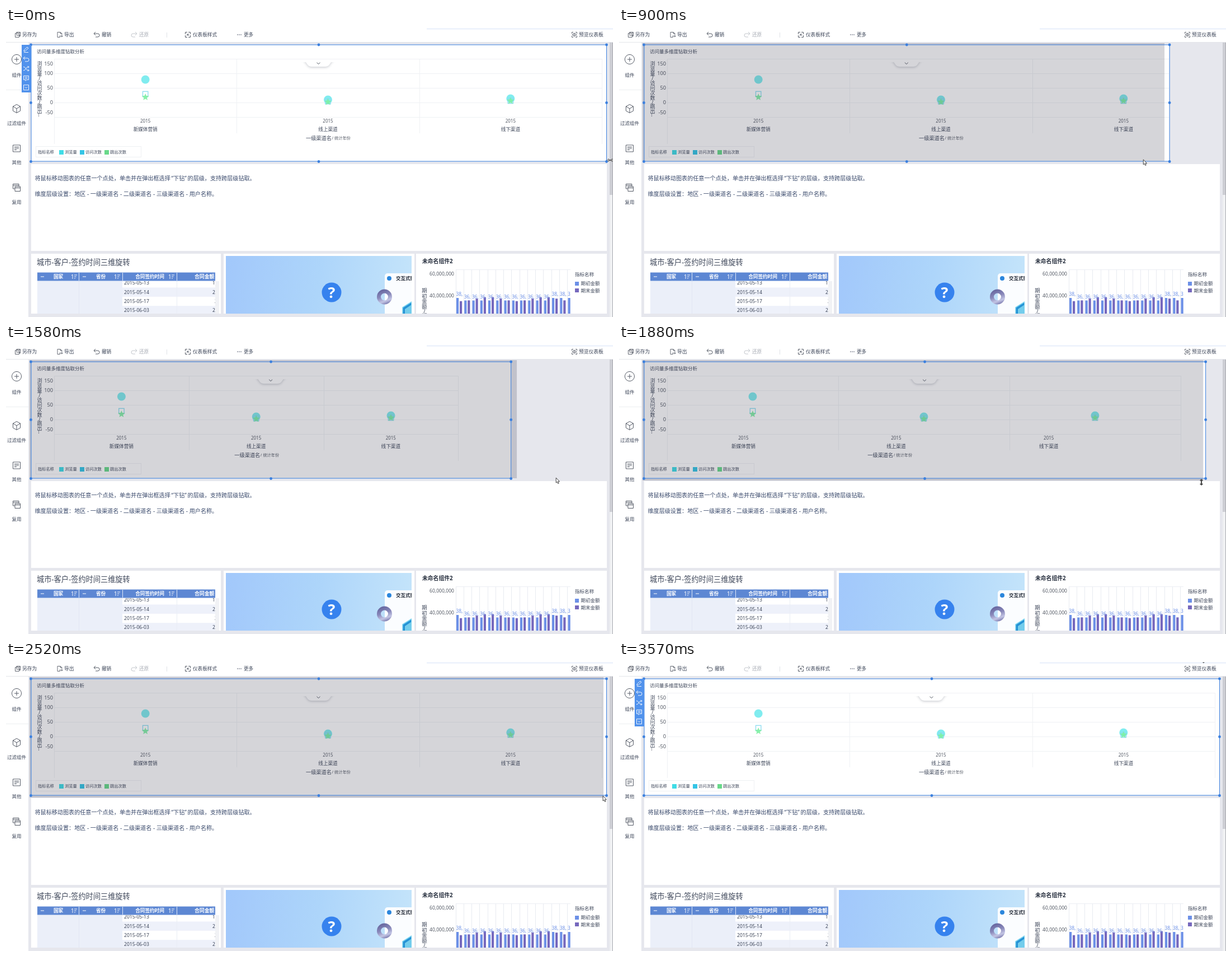
Recreate the animation shown at these times as an HTML page with a canvas. Size 1085 by 516 pixels, loop 3.63 s.

```html
<!DOCTYPE html>
<html lang="zh">
<head>
<meta charset="utf-8">
<title>仪表板</title>
<style>
html, body { margin: 0; width: 100%; height: 100%; overflow: hidden; background: #fff; }
canvas { display: block; }
</style>
</head>
<body>
<canvas id="stage" width="1085" height="516"></canvas>
<script>
const ctx = document.getElementById('stage').getContext('2d');
const LOOP = 3630;
const FONT = '"Noto Sans", "Noto Sans CJK SC", "Noto Sans CJK", sans-serif';
const BLUE = '#3b80df', INK = '#3d4659', SLATE = '#39496b', GREY = '#555b66', BG = '#e6e7ed';
const FULL = 1073, NARROW = 816;

// Motion
const ease = p => (1 - Math.cos(Math.PI * Math.min(1, Math.max(0, p)))) / 2;

// Moves from a to b until the turn, then back to a.
function sweep(t, a, b, start, turn, end) {
  const p = t < turn ? ease((t - start) / (turn - start)) : ease((end - t) / (end - turn));
  return a + (b - a) * p;
}

const edgeAt = t => sweep(t, FULL, NARROW, 640, 1290, 2030);
const ghostAt = t => sweep(t, 1068, NARROW, 660, 1240, 2040);

// The marks are laid out again only now and then; the labels trail behind.
function plotAt(t) {
  const every = 480, phase = 350, delay = 85;
  return edgeAt(Math.floor((t - delay - phase) / every) * every + phase);
}
const labelAt = t => edgeAt(t - 280);
const titleAt = t => edgeAt(t - 325);

// Pointer: [time, x, y]
const PATH = [[50, 1080, 236], [80, 1079, 242], [600, 1079, 242], [1150, 820, 229],
  [1580, 983, 237], [1880, 1041, 245], [2520, 1067, 239], [2720, 1069, 244],
  [2980, 894, 110], [3340, 1041, 0], [3570, 1041, -9]];

function pointerAt(t) {
  const i = PATH.findIndex(k => t < k[0]);
  if (i <= 0) return PATH.at(i).slice(1);
  const [t0, x0, y0] = PATH[i - 1], [t1, x1, y1] = PATH[i];
  const p = (t - t0) / (t1 - t0);
  return [x0 + (x1 - x0) * p, y0 + (y1 - y0) * p];
}

// Drawing helpers
function box(x, y, w, h, color) {
  ctx.fillStyle = color;
  ctx.fillRect(x, y, w, h);
}

function line(x0, y0, x1, y1, color) {
  ctx.strokeStyle = color;
  ctx.lineWidth = 1;
  ctx.beginPath();
  ctx.moveTo(x0, y0);
  ctx.lineTo(x1, y1);
  ctx.stroke();
}

function disc(x, y, r, color) {
  ctx.fillStyle = color;
  ctx.beginPath();
  ctx.arc(x, y, r, 0, 7);
  ctx.fill();
}

// y is the visual middle of the line.
function text(s, x, y, size, color = INK, align = 'left', weight = 400) {
  ctx.font = `${weight} ${size}px ${FONT}`;
  ctx.textAlign = align;
  ctx.fillStyle = color;
  ctx.fillText(s, x, y + size * 0.37);
}

function icon(d, x, y, color, width = 1, fill) {
  const path = new Path2D(d);
  ctx.save();
  ctx.translate(x, y);
  if (fill) { ctx.fillStyle = fill; ctx.fill(path); }
  ctx.strokeStyle = color;
  ctx.lineWidth = width;
  ctx.stroke(path);
  ctx.restore();
}

function clipTo(x, y, w, h, draw) {
  ctx.save();
  ctx.beginPath();
  ctx.rect(x, y, w, h);
  ctx.clip();
  draw();
  ctx.restore();
}

function vertical(s, x, y, size) {
  for (const c of s) {
    const slash = c === '/';
    text(c, x, y - (slash ? 1 : 0), size, INK, 'center');
    y += slash ? 6.5 : size;
  }
}

const UNDO = 'M-2,-5L-5,-2L-2,1M-5,-2H2A3,3 0 0 1 2,4H-2';
const REDO = 'M2,-5L5,-2L2,1M5,-2H-2A3,3 0 0 0 -2,4H2';

function toolbar() {
  box(0, 0, 1085, 25, '#fff');
  box(752, 0, 333, 3, '#eff4fc');
  line(0, 25.5, 1085, 25.5, '#e3e5ea');
  icon('M-4.5,-2.5H-2V-4.5H4.5V2.5H2.5M-4.5,-2.5V4.5H2.5V-1M-2,-4.5V1H4.5M0,-4.5V-2H3V-4.5', 21, 12, GREY, .9);
  text('另存为', 29, 12, 8.7);
  icon('M1,4.5H-4V-4.5H1L4,-2V0M1,-4.5V-2H4M-1,2.5H5M3,.5L5,2.5L3,4.5', 96, 12, GREY, .9);
  text('导出', 104, 12, 8.8);
  icon(UNDO, 162, 12, GREY);
  text('撤销', 171, 12, 8.6);
  icon(REDO, 229, 12, '#c3c6cc');
  text('还原', 238, 12, 8.6, '#a5a9b2');
  line(287.5, 8, 287.5, 17, '#e0e2e7');
  icon('M-4.5,-1V-4.5H-1M1,-4.5H4.5V-1M4.5,1V4.5H1M-1,4.5H-4.5V1M-2,-2L2,2M2,-2L-2,2', 325, 12, GREY);
  text('仪表板样式', 334, 12, 8.6);
  for (let i = 0; i < 3; i++) disc(414 + i * 3, 12, .8, INK);
  text('更多', 425, 12, 8.6);
  icon('M-4.5,-2V-4.5H-2M2,-4.5H4.5V-2M4.5,2V4.5H2M-2,4.5H-4.5V2M-4,0Q0,-5 4,0Q0,5 -4,0M1.3,0A1.3,1.3 0 1 1 1.3,-.1', 1016, 12, GREY, .9);
  text('预览仪表板', 1024, 12, 8.75);
}

function sidebar() {
  box(0, 26, 40, 490, '#fff');
  line(0, 110.5, 40, 110.5, '#eceef1');
  icon('M8.5,0A8.5,8.5 0 1 1 8.5,-.1M-4,0H4M0,-4V4', 19, 56, GREY);
  icon('M0,-7.5L6.5,-4V4L0,7.5L-6.5,4V-4ZM-6.5,-4L0,0L6.5,-4M0,0V7.5', 19, 144, GREY);
  icon('M-6.5,-6H6.5V6H-6.5ZM-4,-2.5H4M-4,0H4M-4,2.5H0', 19, 215, GREY);
  icon('M-6.5,-6.5H4V-2M-6.5,-6.5V2H-3M-6.5,-4H4M-3,-2H6.5V6.5H-3ZM-3,.5H6.5', 19, 285, GREY);
  text('组件', 19, 84, 8.5, INK, 'center');
  ['过滤组件', '其他', '复用'].forEach((s, i) => text(s, 19, 169.5 + i * 70.5, 8.5, INK, 'center'));
}

function scrollbar() {
  box(1079, 26, 6, 490, '#eff0f3');
  box(1079, 26, 5, 272, '#cdced4');
  line(1084.5, 26, 1084.5, 516, '#a9abb1');
}

function notes() {
  box(45, 243, 1029, 155, '#fff');
  text('将鼠标移动图表的任意一个点处，单击并在弹出框选择\u2009“下钻”\u2009的层级，支持跨层级钻取。', 51.5, 268.5, 10.1, SLATE);
  text('维度层级设置：地区 - 一级渠道名 - 二级渠道名 - 三级渠道名 - 用户名称。', 51.5, 296, 10.1, SLATE);
}

function table() {
  box(45, 403, 339, 107, '#fff');
  text('城市-客户-签约时间三维旋转', 55, 418, 13.2);
  box(56, 452, 152, 58, '#ebeff9');
  box(374, 452, 7, 58, '#f1f2f5');
  clipTo(208, 452, 166, 58, () => {
    ['2015-05-13', '2015-05-14', '2015-05-17', '2015-06-03'].forEach((day, i) => {
      const y = 455 + i * 16.4;
      if (i % 2) box(208, y - 8, 166, 16.4, '#eef1fa');
      text(day, 211, y, 8.6);
      text(i ? '2' : '10', i === 2 ? 373 : 369, y, 8.6);
    });
  });
  line(130.5, 452, 130.5, 510, '#e1e6f3');
  line(305.5, 452, 305.5, 510, '#e9edf5');
  box(56, 436.5, 318, 15, '#5d87d3');
  for (const x of [130.5, 208.5, 305.5]) line(x, 437, x, 451, '#dfe8f8');
  for (const x of [65, 140]) line(x - 3, 444, x + 3, 444, '#fff');
  text('国家', 93.5, 444, 8.6, '#fff', 'center', 700);
  text('省份', 169.5, 444, 8.6, '#fff', 'center', 700);
  text('合同签约时间', 257, 444, 8.6, '#fff', 'center', 700);
  clipTo(306, 436, 68, 16, () => text('合同金额', 337, 444, 8.9, '#fff', 'left', 700));
  for (const x of [122, 199, 296]) icon('M-3,4V-4L-5,-2M0,-3H5M0,0H3.5M0,3H2', x, 444, '#fff', .9);
}

function picture() {
  box(389, 403, 341, 107, '#fff');
  clipTo(393, 407, 332, 103, () => {
    const sky = ctx.createLinearGradient(393, 430, 725, 470);
    sky.addColorStop(0, '#a2c8fb');
    sky.addColorStop(.5, '#add5fa');
    sky.addColorStop(1, '#c4e4fa');
    box(393, 407, 332, 103, sky);
    ctx.fillStyle = '#fbfdff';
    ctx.beginPath();
    ctx.roundRect(677, 438, 70, 100, 5);
    ctx.fill();
    disc(685, 447, 4, '#2b86dc');
    text('交互式数', 697, 447, 8.5, '#222936', 'left', 700);
    icon('M709,499L725,489V516H709Z', 0, 0, '#7bd4f0', 1.5, '#2592d5');
    icon('M713,502L725,494V516H713Z', 0, 0, 'transparent', 1, '#74cdec');
    const metal = ctx.createLinearGradient(672, 466, 682, 494);
    metal.addColorStop(0, '#62629c');
    metal.addColorStop(.45, '#8a8abb');
    metal.addColorStop(.75, '#c3c5e4');
    metal.addColorStop(1, '#6b6ba3');
    ctx.strokeStyle = metal;
    ctx.lineWidth = 7;
    ctx.beginPath();
    ctx.arc(676.5, 480, 10, 0, 7);
    ctx.stroke();
    disc(582, 472, 17.5, '#3682ee');
    text('?', 582, 472, 27, '#fff', 'center', 700);
  });
}

function bars() {
  const count = 15, pitch = 14.25, left = 805;
  box(733, 403, 341, 107, '#fff');
  text('未命名组件2', 744, 416, 9.8, '#272f3e', 'left', 700);
  text('60,000,000', 801, 439, 8.6, GREY, 'right');
  text('40,000,000', 801, 478, 8.6, GREY, 'right');
  clipTo(733, 403, 341, 107, () => {
    vertical('期初金额/期', 748, 469, 9.4);
    for (const y of [431.5, 478.5]) line(left, y, 1009, y, '#eceff4');
    for (let i = 0; i < count; i++) {
      const x = Math.floor(left + i * pitch) - .5;
      line(x, 431, x, 510, '#e8ebf1');
    }
    clipTo(803, 431, 206, 79, () => {
      for (let i = 0; i < count; i++) {
        const x = left + i * pitch, high = i % 12 === 0 || i > 12;
        box(x, high ? 482 : 486.5, 4.2, 30, '#6c90e7');
        if (i < count - 1) box(x + 6, 484 + 3.7 * Math.cos(i * Math.PI * 2 / 7), 4.2, 40, '#7668bd');
        text(high ? '38,' : '36,', x - .5, high ? 475 : 479.5, 8.4, '#6c90e7');
      }
    });
  });
  text('指标名称', 1017, 440, 8.5);
  box(1017, 453, 7, 7, '#6c90e7');
  text('期初金额', 1027.5, 456, 8.5);
  box(1017, 465, 7, 7, '#7668bd');
  text('期末金额', 1027.5, 468.5, 8.5);
}

function star(x, y, r) {
  ctx.fillStyle = 'rgba(126,239,162,.9)';
  ctx.beginPath();
  for (let i = 0; i < 10; i++) {
    const a = i * Math.PI / 5 - Math.PI / 2, k = i % 2 ? r * .45 : r;
    ctx.lineTo(x + k * Math.cos(a), y + k * Math.sin(a));
  }
  ctx.fill();
}

function marks(x, round, square, point) {
  disc(x, round, 7.5, '#80ecef');
  ctx.strokeStyle = '#8bdcf0';
  ctx.lineWidth = 1.3;
  ctx.strokeRect(x - 4.7, square - 4.7, 9.4, 9.4);
  star(x, point, 6.6);
}

function pullTab(x) {
  ctx.save();
  ctx.shadowColor = 'rgba(50,60,80,.25)';
  ctx.shadowBlur = 4;
  ctx.shadowOffsetY = 1.5;
  clipTo(x - 36, 61, 72, 16, () =>
    icon('M-30,-7C-20,-5 -22,6 -12,6H12C22,6 20,-5 30,-7Z', x, 63, 'transparent', 1, '#fff'));
  ctx.restore();
  icon('M-3,-1.3L0,1.5L3,-1.3', x, 63, GREY);
}

function chart(t, edge) {
  const left = 86, right = plotAt(t) - 8, zero = 133, unit = .52;
  const col = (right - left) / 3, step = (labelAt(t) - 8 - left) / 3;
  const grid = '#eff1f4';
  box(45, 30, edge - 45, 208, '#fff');
  clipTo(45, 30, edge - 45, 208, () => {
    text('访问量多维度钻取分析', 55, 42, 8.5);
    for (let i = 0; i < 4; i++) {
      const x = Math.round(left + i * col) + .5;
      line(x, 55, x, i % 3 ? 188 : 207, grid);
    }
    for (let v = 150; v >= -50; v -= 50) {
      const y = zero - v * unit;
      line(left, Math.round(y) + .5, right, Math.round(y) + .5, grid);
      text(v, 84, Math.min(151, Math.max(64, y)), 9.2, GREY, 'right');
    }
    vertical('浏览量/访问次数/跳出', 60, 64, 9);
    for (const y of [154, 157]) disc(58.5, y, .7, INK);
    const spots = [[92, 118, 123.5], [128, 131, 132], [126, 130, 130]];
    ['新媒体营销', '线上渠道', '线下渠道'].forEach((name, i) => {
      marks(left + (i + .5) * col, ...spots[i]);
      const x = left + (i + .5) * step;
      text('2015', x, 166.5, 8, GREY, 'center');
      text(name, x, 180.5, 8.6, INK, 'center');
    });
    const mid = (left + titleAt(t) - 8) / 2;
    text('一级渠道名', mid - 39.5, 196.5, 9.2);
    text('/ 统计年份', mid + 7, 196.5, 7.2, GREY);
    ctx.strokeStyle = '#eef0f3';
    ctx.lineWidth = 1;
    ctx.strokeRect(53.5, 211.5, 188, 19);
    text('指标名称', 57, 221.5, 7.2);
    [[95, '#40dce6', '浏览量'], [132, '#34c5e6', '访问次数'], [176, '#69d98a', '跳出次数']].forEach(([x, c, s]) => {
      box(x, 218, 8, 8, c);
      text(s, x + 10, 221.5, 7.25);
    });
    pullTab((44 + edge) / 2);
  });
}

function selection(edge) {
  ctx.strokeStyle = BLUE;
  ctx.lineWidth = 1;
  ctx.strokeRect(45, 30, edge - 44.5, 208);
  const mid = (45 + edge) / 2;
  for (const x of [44.5, mid, edge + .5])
    for (const y of [30, 133.5, 238.5])
      if (x !== mid || y !== 133.5) disc(x, y, 2.4, BLUE);
}

function floatBar() {
  box(28, 30, 17, 85, '#5192ec');
  const glyphs = ['M-4,4.5H4M-4,2.5L-3.5,0L2,-5L4,-3L-1.5,2Z', UNDO,
    'M-5,-3H-3L2,3H5M3,1L5,3L3,5M-5,3H-3L2,-3H5M3,-5L5,-3L3,-1',
    'M-4.5,-4H4.5V3H1L-1,5V3H-4.5ZM-2.5,-1.5H2.5M-2.5,.8H2.5',
    'M-4.5,-4.5H4.5V4.5H-4.5ZM-2.2,-1L0,1.2L2.2,-1'];
  glyphs.forEach((d, i) => icon(d, 36, 39 + i * 16.8, '#fff', .9));
}

const ARROW = 'M0,0V9L2,7.2L3.4,10.5L5,9.8L3.6,6.7H6.3Z';
const SPAN = 'M-5.5,0L-3,-2.5V-.6H3V-2.5L5.5,0L3,2.5V.6H-3V2.5Z';

function pointer(t) {
  const [x, y] = pointerAt(t);
  const upright = (t > 1720 && t < 2000) || (t > 2600 && t < 2740);
  const turn = t < 65 ? 0 : t < 600 ? Math.PI / 4 : upright ? Math.PI / 2 : null;
  if (turn === null) return icon(ARROW, x, y, '#333', .9, '#fff');
  ctx.save();
  ctx.translate(x, y);
  ctx.rotate(turn);
  icon(SPAN, 0, 0, '#333', .8, upright ? '#444' : '#fff');
  ctx.restore();
}

function draw(t) {
  const edge = edgeAt(t);
  const dragging = t >= 620 && t < 2600;
  box(0, 0, 1085, 516, BG);
  scrollbar();
  toolbar();
  sidebar();
  notes();
  table();
  picture();
  bars();
  chart(t, edge);
  if (dragging) {
    const bottom = t < 1700 ? 238 : 242;
    box(42, 27, ghostAt(t) - 42, bottom - 27, 'rgba(45,45,65,.2)');
  }
  selection(edge);
  if (!dragging) floatBar();
  pointer(t);
}

function loop() {
  draw(performance.now() % LOOP);
  requestAnimationFrame(loop);
}
loop();
</script>
</body>
</html>
```
